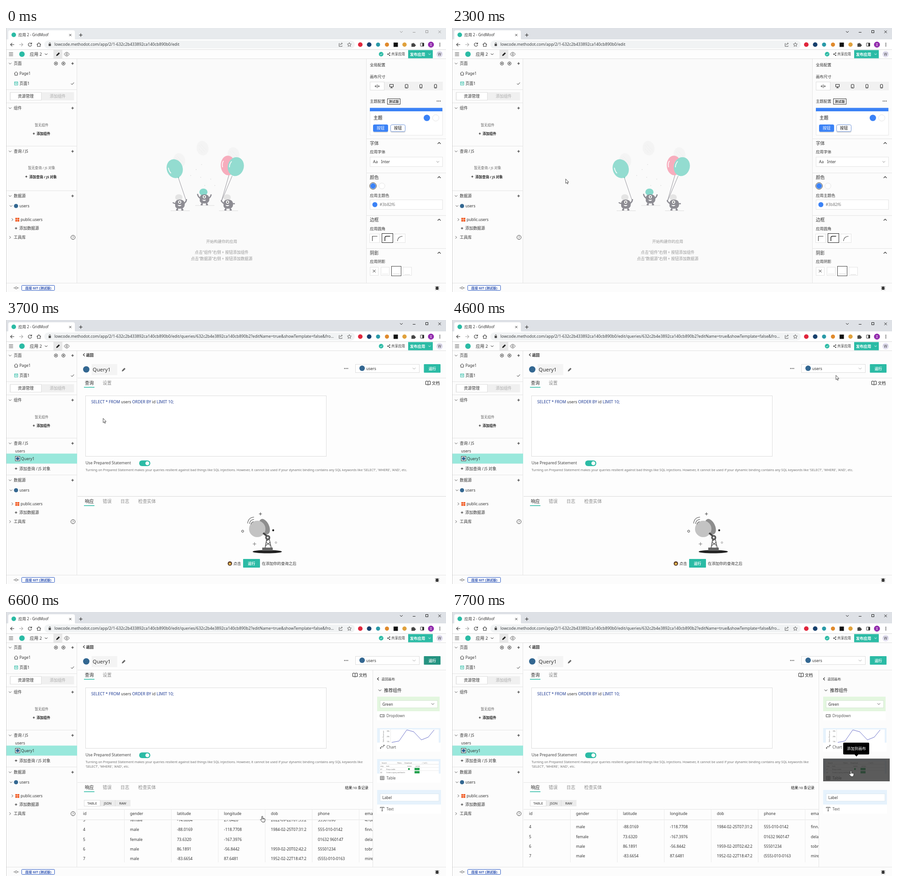
An HTML page that plays this animation: 965x580 px, repeating every 8000 ms.

```html
<!DOCTYPE html>
<html>
<head>
<meta charset="utf-8">
<style>
html, body { margin: 0; width: 100%; height: 100%; overflow: hidden; background: #fbfbfb }
svg { display: block; width: 965px; height: 580px; font-family: "Noto Sans", "Open Sans", "Noto Sans CJK SC", "Noto Sans CJK", sans-serif }
text { white-space: pre }
</style>
</head>
<body>
<script>
const TEAL = '#2bbba5', BLUE = '#3b82f6', INK = '#333', RULE = '#e4e4e4', GREY = '#999', PG = '#336791';

// Latin runs are set a little smaller than the CJK around them
const T = (x, y, s, size = 8.7, color = INK, more = '') =>
  `<text x="${x}" y="${y}" font-size="${size}" fill="${color}" ${more}>` +
  s.replace(/[ -~“”…]+/g, m => `<tspan font-size="${(size * .945).toFixed(2)}">${m}</tspan>`) + '</text>';
const B = (x, y, s, size, color, more = '') => T(x, y, s, size, color, 'font-weight="600" ' + more);
const MID = 'text-anchor="middle"';
const R = (x, y, w, h, fill = 'none', stroke = 'none', r = 0) =>
  `<rect x="${x}" y="${y}" width="${w}" height="${h}" rx="${r}" fill="${fill}" stroke="${stroke}"/>`;
const box = (x, y, w, h, stroke = RULE, fill = '#fff', r = 0) => R(x + .5, y + .5, w - 1, h - 1, fill, stroke, r);
const C = (x, y, r, fill = 'none', stroke = 'none') =>
  `<circle cx="${x}" cy="${y}" r="${r}" fill="${fill}" stroke="${stroke}"/>`;
const E = (x, y, rx, ry, fill, turn = 0) =>
  `<ellipse rx="${rx}" ry="${ry}" fill="${fill}" transform="translate(${x} ${y}) rotate(${turn})"/>`;
const P = (d, stroke = INK, w = 1, fill = 'none') =>
  `<path d="${d}" stroke="${stroke}" stroke-width="${w}" fill="${fill}"/>`;
const hline = (y, x1, x2, c = RULE) => R(x1, y, x2 - x1, 1, c);
const down = (x, y, c = '#555', r = 2.8) => P(`M${x - r},${y - r / 2}l${r},${r} ${r},${-r}`, c);
const up = (x, y) => P(`M${x - 3.3},${y + 1.7}l3.3,-3.3 3.3,3.3`, '#222', 1.2);
const right = (x, y) => P(`M${x - 1.5},${y - 2.8}l2.8,2.8 -2.8,2.8`, '#555');
const left = (x, y) => P(`M${x + 1.5},${y - 3}l-3,3 3,3`, '#222', 1.1);
const plus = (x, y, r = 2.8, c = '#222') => P(`M${x - r},${y}h${2 * r}M${x},${y - r}v${2 * r}`, c, 1.1);
const cross = (x, y, r = 2.7, c = INK) => P(`M${x - r},${y - r}l${2 * r},${2 * r}m0,${-2 * r}l${-2 * r},${2 * r}`, c);
const dots = (x, y, dx = 3.4, dy = 0) => [-1, 0, 1].map(i => C(x + i * dx, y + i * dy, 1, INK)).join('');
const pencil = (x, y, c) => P(`M${x - 3.5},${y + 3.5}l.7,-2.4 4.6,-4.6 1.8,1.8 -4.6,4.6z`, c, .8, c);
const gear = (x, y) => C(x, y, 3.6, 'none', INK) + C(x, y, 1.4, INK);
const search = (x, y) => C(x - 1, y - 1, 3, 'none', INK) + P(`M${x + 1.3},${y + 1.3}l3,3`);
const G = (move, s) => `<g transform="translate(${move})">${s}</g>`;
// shown only within the given spans of ms, "from-to from-to"
const on = (spans, s) => `<g data-on="${spans}">${s}</g>`;

function windowControls(c) {
  return down(867, 8.5, c, 3) + P('M892,9.5h6', c) + R(920.5, 5.5, 5, 5, 'none', c) + cross(951, 8.5, 2.8, c);
}

function browser() {
  const base = 'lowcode.methodot.com/app/2/1-632c2b433892ca140cb890b0/edit';
  const query = v => base + `/queries/632c2b4e3892ca140cb890b2?editName=true&amp;showTemplate=${v}&amp;fro…`;
  const url = s => T(106, 39.3, s, 9.3, '#3c4043');
  return R(0, 0, 965, 26, '#dee1e6') + on('0-200', R(0, 0, 965, 26, '#e7eaed') + windowControls('#999')) +
    on('200-8000', windowControls('#222')) +
    P('M2,26q3,0 3,-3V9q0,-4 4,-4H147q4,0 4,4V23q0,3 3,3z', 'none', 0, '#fff') +
    C(17, 15, 5, TEAL) + T(27, 18, '应用 2 - GridMoof', 8.5) + cross(141, 15.5, 2.3) + plus(164, 15.5, 3.7) +
    R(0, 25, 965, 22, '#fff') + R(84, 27.5, 681, 17.5, '#f1f3f4', 'none', 8.7) +
    P('M18,36.5h-8m3.6,-3.7l-3.7,3.7 3.7,3.7', '#444', 1.2) + P('M29,36.5h8m-3.6,-3.7l3.7,3.7 -3.7,3.7', '#aaa', 1.2) +
    P('M55.5,34.2a3.7,3.7 0 1 0 .7,3M56.3,32v2.9h-2.9', '#444', 1.2) +
    P('M67.5,36.5l4.5,-4 4.5,4M69,35.5v5h6v-5', '#444', 1.2) +
    R(93.5, 35, 5, 4.6, '#444', 'none', .6) + P('M94.6,35v-1.3a1.5,1.5 0 0 1 3,0v1.3', '#444', .9) +
    on('0-2400', url(base)) + on('2400-3700', url(query('true'))) + on('3700-8000', url(query('false'))) +
    P('M732,34h-1.5v6.5h6.5v-2M732.5,38q.5,-4 5,-4m-2,-2l2.2,2 -2.2,2', '#555', .9) +
    P('M753,32l1.3,2.9 3.1,.3 -2.3,2.1 .7,3.1 -2.8,-1.6 -2.8,1.6 .7,-3.1 -2.3,-2.1 3.1,-.3z', '#555', .9) +
    C(777, 36.5, 5, '#e0263c') + C(796.5, 36.5, 5, '#17406d') + C(816, 36.5, 4.5, '#2a9aa8') + C(835.5, 36.5, 4.5, '#e08a2c') +
    R(850, 32, 9.5, 9.5, '#111') + C(874, 36.5, 4.7, '#e0a13c') +
    P('M889.5,34.5h2a1.5,1.5 0 1 1 3,0h2v2.2a1.4,1.4 0 1 1 0,2.6v1.7h-7z', '#444', .6, '#444') +
    R(909, 33, 7.5, 7, 'none', '#333', .5) + R(913, 33, 3.5, 7, '#333') +
    C(932, 36.5, 6.5, '#8e24aa') + T(932, 39, '文', 6.5, '#fff', MID) + dots(951.5, 36.5, 0, 3) + hline(47, 0, 965, '#dcdcdc');
}

function header() {
  return R(0, 48, 965, 19, '#fdfdfd') + P('M6.5,54.5h9m-9,3.2h9m-9,3.2h9', '#444') + C(35, 57.5, 6, TEAL) +
    T(52, 61, '应用 2', 9.6) + down(88, 57.5, '#222') + R(104, 48, 19.5, 19, '#e8e8e8') + pencil(114, 57.5, '#222') +
    P('M127.5,57.5q5.7,-8.5 11.4,0q-5.7,8.5 -11.4,0z', '#555') + C(133.2, 57.5, 1.7, 'none', '#555') +
    C(822.7, 57.5, 5, TEAL) + P('M820.3,57.6l1.8,1.8 3.1,-3.4', '#fff') +
    P('M841.5,55l-4,2.5 4,2.5', INK, .8) + C(841.5, 55, 1.2, INK) + C(837.5, 57.5, 1.2, INK) + C(841.5, 60, 1.2, INK) +
    T(845, 60.3, '共享应用', 7.5) + R(882, 48.5, 54, 18, TEAL) + B(886, 60.5, '发布应用', 8.3, '#fff') + down(929, 57.5, '#fff', 2.4) +
    C(951, 57.5, 7, '#e2dff0') + T(951, 60.6, 'W', 8.5, '#444', MID) + hline(67, 0, 965, '#e0e0e0');
}

const section = (y, name) => hline(y - 12, 0, 155) + down(9, y) + T(17, y + 3, name) + plus(146, y);

function sidebar() {
  const sources = section(369, '数据源') + down(11, 391) + C(22, 391, 4.6, PG) + T(29.5, 394, 'users', 9) +
    right(14, 421) + R(20.5, 417, 4, 3.6, '#f15a22') + R(25.2, 417, 4, 3.6, '#f15a22') + R(20.5, 421.3, 4, 4, '#f15a22') + R(25.2, 421.3, 4, 4, '#f15a22') +
    T(32, 424, 'public.users', 9) + plus(22, 440, 2.6) + T(29, 443, '添加数据源') + right(9, 460) + T(17, 463, '工具库') +
    C(147, 460, 4.6, 'none', '#444') + T(147, 463, '?', 7.5, '#333', MID);
  return R(0, 68, 155, 492, '#fcfcfc') + R(155, 68, 1, 492, RULE) +
    down(9, 78) + T(17, 81, '页面') + gear(109.5, 78) + gear(126, 78) + plus(146, 78) +
    P('M18,100l4.2,-3.8 4.2,3.8M19.3,99.2v4.6h5.8v-4.6') + T(29.5, 103.3, 'Page1', 8.9) +
    R(18.8, 118.3, 7, 7, 'none', TEAL) + P('M18.8,120.8h7m-4.5,2h2.5', TEAL) + T(29.5, 125, '页面1') + P('M142.5,122l2.3,2.3 4.3,-4.5') +
    hline(135, 0, 155) + R(8, 141, 141, 18, '#f0f0f0') + box(9, 141, 69, 18, '#ddd') + T(26, 153.3, '资源管理') + T(96, 153.3, '添加组件', 8.7, '#aaa') +
    section(176, '组件') + T(78, 215.7, '暂无组件', 7.5, '#666', MID) + plus(61, 232, 2.2) + B(67, 235, '添加组件', 7.5, '#222') +
    section(271, '查询 / JS') +
    on('0-2400', T(78, 310, '暂无查询 / JS 对象', 7.6, '#666', MID) + on('900-1100', R(39, 318, 78, 17, '#ececec')) +
      plus(44.5, 326.5, 2.2) + B(51, 329.5, '添加查询 / JS 对象', 7.6, '#222') + sources) +
    on('2400-8000', T(20, 290.5, 'users', 9) + R(0, 293.5, 156, 22, '#99e8dc') + box(20, 299, 11, 11, '#444') + C(25.5, 304.5, 3.6, PG) +
      T(33, 308, 'Query1', 9) + plus(22, 326.5, 2.6) + T(29, 329.7, '添加查询 / JS 对象') + G('0 -17', sources)) +
    on('1100-2200', R(137.5, 260, 18, 21.7, '#1f1f1f') + plus(146, 271, 2.8, '#fff'));
}

function footer() {
  return R(0, 560, 965, 20, '#fcfcfc') + hline(560, 0, 965) + P('M16.5,571h3.3m5,0h3.3', '#666') + C(22.3, 571, 2.3, 'none', '#666') +
    box(34, 565, 73, 12, '#2b59c3', '#fff', 1) + B(70.7, 573.8, '连接 GIT (测试版)', 7.4, '#2b50b0', MID) +
    P('M941,568l2.5,1.5M941,572h2.5M941.5,575.5l2.2,-1.5M950,568l-2.5,1.5M950,572h-2.5M949.5,575.5l-2.2,-1.5') + E(945.5, 571.5, 2.8, 4, INK);
}

// armL and armR are the heights of the hands above the body's centre
function monster(x, y, hair, hairSize, armL, armR, eye) {
  const c = '#8d8c93';
  return hline(y + 16, x - 20, x + 22, '#ddd') + E(x - 2, y - 13, hairSize, hairSize * .85, hair) +
    P(`M${x - 8},${y + 1}q-6,${-armL / 3} -7,${-armL}M${x + 9},${y + 1}q5,${-armR / 3} 6,${-armR}`, c, 2.6) +
    P(`M${x - 5},${y + 9}v5.5h-3M${x + 5},${y + 9}v5.5h3`, c, 3) +
    P(`M${x - 10},${y + 3}q-1,-11 10,-11t11,11q0,9 -11,9t-10,-9z`, 'none', 0, c) +
    C(x + eye, y - 2.5, 3.4, '#fff') + C(x + eye, y - 2.5, 1.5, '#555') + P(`M${x + eye - 5},${y + 4}q5,5 9,0z`, 'none', 0, '#fff');
}

function emptyCanvas() {
  const faint = [[380, 291], [431, 264], [499, 278]].map(([x, y]) =>
    E(x, y, 13, 16, '#f4f4f4', -10) + P(`M${x - 8},${y - 7}l13,15m-13,-7l9,10m-5,-20l13,14`, '#ededed', .8)).join('');
  const specks = [[429, 300], [417, 311], [405, 324], [436, 346], [427, 328], [449, 332], [458, 346]].map(([x, y]) => C(x, y, 1, '#e0e0e0')).join('');
  return R(156, 68, 634, 492, '#fafafa') + faint + specks +
    P('M378,329L396,382M489,323L472,382M496,325L472,382', '#8d8c93', .9) +
    E(370, 309, 17.5, 21, '#93dcd0', -18) + P('M376,328l4,-1 -1,4z', 'none', 0, '#7fcabd') + P('M356,307q2,9 6,12', '#fff', 1.6) +
    E(487, 302, 16, 21.5, '#f7adbd', -3) + P('M475,306q-2,-9 2,-14', '#fff', 1.6) +
    E(504, 304.5, 17.5, 21, '#93dcd0', 15) + P('M490,306q0,-8 5,-13', '#fff', 1.6) +
    monster(381, 385, '#e4e4e4', 8, 3, 10, 0) + monster(435, 373.5, '#86d8cb', 9, 10, 9, 0) + monster(487, 385, '#e4e4e4', 8, 8, 0, -1);
}

function canvasHints() {
  return T(473, 472, '开始构建你的应用', 8.5, GREY, MID) + T(473, 496.3, '点击“组件”右侧 + 按钮添加组件', 8.6, GREY, MID) +
    T(473, 510.3, '点击“数据源”右侧 + 按钮添加数据源', 8.6, GREY, MID);
}

function themePanel() {
  const fold = (y, name, sub, subY = y + 22) =>
    hline(y - 10, 791, 965) + T(798, y + 3.5, name, 9.8) + up(950, y) + T(798, subY, sub, 8.5);
  const phones = [878, 910, 942].map((x, i) => R(x - 2.5, 124, 5 + (i < 1), 8, 'none', '#222', 1) + R(x - 1, 130, 2, 1, '#222')).join('');
  return R(790, 68, 175, 492, '#fcfcfc') + R(790, 68, 1, 492, RULE) +
    T(798, 83.5, '全局配置', 8.5) + T(798, 110, '画布尺寸', 8.5) + R(798, 118, 160, 19, '#f1f1f1') + box(798, 118, 32, 19, '#ddd') +
    P('M814,124v8M811,126l-1.8,2 1.8,2M817,126l1.8,2 -1.8,2M809.5,128h3M815.5,128h3', '#222', .9) +
    R(841.5, 124, 8, 5, 'none', '#222') + P('M843,131.5h5M845.5,129v2', '#222') + phones +
    T(798, 164, '主题配置', 8.5) + box(836, 155, 29, 13, '#333') + B(850.5, 164, '测试版', 7.3, INK, MID) + dots(949, 160.5) +
    box(798, 176, 160, 60, '#e8e8e8') + R(798, 175.5, 159, 7.5, BLUE) + T(806, 201.3, '主题', 9.7, '#111', 'font-weight="500"') + C(923, 197.5, 7, BLUE) + C(942.5, 197.5, 7, '#fff', RULE) +
    R(805, 213, 33, 17, '#0002', 'none', 3) + R(805, 212, 33, 16, BLUE, 'none', 3) + T(821.5, 223, '按钮', 8.6, '#fff', MID) +
    R(843, 213, 33, 17, '#0002', 'none', 3) + box(843, 212, 33, 16, '#6f95d8', '#fff', 3) + T(859.5, 223, '按钮', 8.6, '#111', MID) +
    fold(253, '字体', '应用字体') + box(798, 283, 160, 22) + T(805, 297.3, 'Aa', 9) + T(822.5, 297.3, 'Inter', 9) + down(947, 294, '#888') +
    fold(328, '颜色', '应用主题色', 371) + C(805, 347, 7.3, '#fff', '#333') + C(805, 347, 6, BLUE) + C(824.5, 347, 6.5, '#fff', RULE) +
    box(798, 377, 160, 22) + C(809, 388, 5.5, BLUE) + T(819.5, 391.3, '#3b82f6', 9.2, '#777') +
    fold(421.5, '边框', '应用圆角') + box(797, 452, 23, 20) + box(824, 451, 25, 21, '#222') + box(852, 452, 24, 20) +
    P('M803.5,468v-10.5h11', '#444', 1.2) + P('M831,468v-7q0,-3.5 3.5,-3.5h8', '#222', 1.5) + P('M858.5,468q1,-10 11,-10.5', '#444', 1.2) +
    fold(494, '阴影', '应用阴影') + box(798, 525, 19, 19) + cross(807.5, 534, 3) + box(822, 525, 19, 19) + hline(540, 825, 838) +
    box(845, 523, 22, 22, '#444') + hline(540, 849, 863, '#ccc') + box(870, 525, 20, 19) + hline(541, 874, 886, '#ddd');
}

function createMenu() {
  const rows = [['新建 API', C(170.5, 314.5, 2.8, '#2d86ab')], ['新建 JS 对象', B(170.5, 339, 'JS', 7.3, '#222', MID)],
    ['新建 cURL 导入', P('M167.8,361l2.5,-6m.4,6l2.5,-6', '#333', .9)], ['users 查询', C(170.5, 379.5, 3.6, PG)], ['添加数据源', plus(170.5, 401.5, 2)]];
  return R(156, 261, 153, 154, '#0001', 'none', 2) + box(156, 259, 152, 154, '#e3e3e3') + T(165, 274, '新建', 8.6) +
    search(170, 293) + T(180, 296, '搜索数据源', 8.5, '#777') + on('1100-1500 2000-2200', R(180, 287.5, .8, 11, '#222')) +
    R(157, 304, 150, 21, '#f0f0f0') + rows.map(([name, icon], i) => {
      const y = 314.5 + i * 21.75;
      return box(165, Math.round(y - 6), 12, 12, '#555') + icon + T(181, y + 3, name, 8.9, '#222');
    }).join('');
}

function preparedNote() {
  const start = 'Turning on Prepared Statement makes your queries resilient against bad things like SQL injections. However, it cannot be used if your dynamic binding contains any SQL keywords like';
  const end = "'SELECT', 'WHERE', 'AND', etc.", small = (y, s) => T(174.5, y, s, 7.53, '#707070');
  return T(174.5, 290, 'Use Prepared Statement', 9.2, '#444') + R(292, 282, 24.5, 12.5, TEAL, 'none', 6.2) + C(310, 288.2, 4.3, '#fff') +
    on('2400-5900', small(305.7, start + ' ' + end)) + on('5900-8000', small(305.7, start) + small(315.5, end));
}

function tabs(y, names) {
  return names.map((n, i) => T(173 + i * 39, y, n, 9.7, i ? '#888' : '#222')).join('') + R(171, y + 5, 23, 1.5, TEAL);
}

function dish() {
  return E(573, 509, 32, 3.6, '#222') + R(562, 500, 23, 7, '#666') + P('M568,502l4,-23h5l5,23M569,496l11,-8m-10,0l11,8M571,486l8,-6', '#555', 1.5) +
    E(567, 454, 10, 18, '#8e8e8e', -25) + C(551, 459, 18, '#c3c3c3') + P('M564,468l10,8', '#444', 4) + C(574, 478, 5.5, '#555') + C(574, 478, 2.3, '#ddd') +
    P('M530,447q1,-13 14,-14M534,448q1,-9 10,-10M537,449q1,-5 6,-6', '#555', 1.1) + plus(558, 426, 3.3, '#444') + plus(545, 492, 3.8, '#777') +
    C(519, 464, 2.3, 'none', '#333') + C(586, 462, 2.2, '#222') + C(592, 489, 1.8, 'none', '#999') +
    C(491, 535, 4.8, '#5a3c2a') + C(491, 535.5, 2.5, '#f2c14e') + T(498.5, 538, '点击', 8.5) + R(520, 525, 37, 19, TEAL, 'none', 1) +
    B(538.5, 537.7, '运行', 8, '#fff', MID) + T(561, 538, '在添加你的查询之后', 8.45);
}

const columns = [169, 272, 375, 478, 581, 684, 787];
const cells = (y, values) => values.map((v, i) => T(columns[i], y, v, 9)).join('');

function results() {
  const rows = [
    ['1', 'female', '41.2075', '-103.5512', '1971-05-11T03:18:2', '55501022', 'nora'],
    ['2', 'male', '-27.9310', '64.1187', '1966-11-03T15:40:2', '555-010-0118', 'otis'],
    ['3', 'female', '-14.6884', '27.6428', '2022-09-22T07:55:2', '55501090', '47de'],
    ['4', 'male', '-88.0169', '-118.7708', '1984-02-25T07:31:2', '555-010-0142', 'finn.'],
    ['5', 'female', '73.6320', '-167.3976', '', '01632 960147', 'dela'],
    ['6', 'male', '86.1891', '-56.8442', '1959-02-20T02:42:2', '55501234', 'tobr'],
    ['7', 'male', '-83.6654', '87.6481', '1952-02-22T18:47:2', '(555)-010-0163', 'mirea'],
    ['8', 'female', '12.4406', '35.9027', '1990-08-14T11:05:2', '55501077', 'lune']];
  const names = ['id', 'gender', 'latitude', 'longitude', 'dob', 'phone', 'ema'];
  return tabs(389, ['响应', '错误', '日志', '检查实体']) + T(743.5, 389, '结果:10 条记录', 7.8, '#111', 'font-weight="500"') +
    R(171, 413, 102, 14, '#ececec') + box(171, 413, 36, 14, '#ddd') + R(239, 413, 1, 14, '#ddd') +
    T(189, 423, 'TABLE', 7.9, INK, MID) + T(223, 423, 'JSON', 7.7, INK, MID) + T(256, 423, 'RAW', 7.7, INK, MID) +
    hline(433, 157, 804) + hline(456, 157, 804) + cells(445.7, names) +
    '<g clip-path="url(#body)"><g id="rows">' + rows.map((r, i) => cells(470.9 + i * 21.15, r)).join('') + '</g></g>' +
    R(659, 457, 12, 92, '#fdfdfd') + columns.slice(1).map(x => R(x - 13, 433, 1, 117, '#ebebeb')).join('');
}

function suggestions() {
  const card = (y, w, tint, name) => R(814, y, w, 52, '#fff') + R(814, y, w, 32, tint) + T(834.5, y + 45, name, 8.6, '#555');
  const tiny = (x, y, s, c = '#666') => T(x, y, s, 3.6, c);
  const mini = R(820, 328, 129, 27, '#fff') + hline(334, 820, 949) + hline(341, 820, 949, '#eee') + hline(348, 820, 949, '#eee') +
    tiny(824, 332.5, 'Search') + tiny(858, 332.5, 'Filters') + tiny(874, 332.5, 'Download') + tiny(912, 332.5, '‹ 1 of 2 ›') + tiny(821, 339.5, 'step') +
    tiny(834, 339.5, 'task') + tiny(880, 339.5, 'status') + tiny(898, 339.5, 'action') + tiny(821, 346.5, '#1') + tiny(834, 346.5, 'Drop a table') +
    tiny(821, 353.5, '#2') + tiny(834, 353.5, 'Create a query and bind it') + R(882, 343, 3.5, 4, '#1fa04b') + R(896, 342.5, 11, 5, '#1fa04b') + R(896, 349.5, 11, 5, '#1fa04b');
  return R(804, 128, 161, 432, '#fcfcfc') + R(804, 128, 1, 432, RULE) + left(816, 147) + T(823.5, 150, '返回画布', 7.4) +
    down(820, 172, '#222', 3) + T(829, 176, '推荐组件', 9.7, '#222') +
    card(186, 137, '#e3f6df', 'Dropdown') + box(820, 194, 127, 17, '#d6e6d4') + T(825.5, 205.5, 'Green', 8.6) + down(936, 202, '#555', 3) +
    R(820.5, 225.5, 9, 5, 'none', '#555') + P('M825.5,228h2.5', '#555') +
    card(255, 139, '#e6f2fc', 'Chart') + R(820, 258, 129, 29, '#fff') + tiny(835, 263, '30k') + tiny(835, 275, '20k') + tiny(835, 286, '10k') +
    T(-286, 829, 'Sales Revenue', 4, '#777', 'transform="rotate(-90)"') + R(843, 258, .6, 28, '#ddd') +
    P('M846,286.5L862,283.5 879,259 894,263 911,281 926,275 939,259', '#6a70c9') +
    P('M821.5,299l2.5,-4 2.5,2 2.5,-4', '#444') + C(821.5, 299, 1.2, '#444') + C(829, 293, 1.2, '#444') +
    card(323, 139, '#e6f2fc', 'Table') + mini + R(821, 361, 8, 7.5, 'none', '#555') + P('M821,363.7h8m-8,2.4h8M825,361v7.5', '#555', .8) +
    card(391, 140, '#e6f2fc', 'Text') + box(820, 399, 130, 17, '#dde8f0') + T(825.5, 410.7, 'Label', 8.6) + P('M821,431v-2h8v2M825,429v8M823.5,437h3', '#444', 1.1) +
    on('6900-8000', R(814, 322, 146, 50, '#333c')) +
    on('7100-8000', R(858, 287, 57, 26, '#000', 'none', 2) + P('M883,313l4,4.5 4,-4.5z', 'none', 0, '#000') + T(887, 303.3, '添加到画布', 8.4, '#fff', MID));
}

function queryPage() {
  const runButton = (c, label = B(935, 109.5, '运行', 8, '#fff', MID)) => R(916.5, 97, 36.5, 18.7, c, 'none', 1) + label;
  const doc = P('M925.5,135q-2.5,-1.5 -5,-.5v7.5q2.5,-.8 5,.7q2.5,-1.5 5,-.7v-7.5q-2.5,-1 -5,.5v7.5', '#222') + T(934, 141.7, '文档', 8.7, '#222');
  const templates = ['Create', 'Select', 'Update', 'Delete'].map((n, i) =>
    R(194.5, 201 + i * 17.6, 2, 2, 'none', '#b9c3d3') + T(200, 205 + i * 17.6, n, 9.15, '#4a5b7c')).join('');
  const name = s => `<tspan fill="#333">${s}</tspan>`;
  const sql = T(187, 183, 'SELECT * FROM users ORDER BY id LIMIT 10;', 9.2, '#1d3a94').replace(/users|\bid\b/g, name);
  return R(156, 68, 809, 492, '#fdfdfd') + left(171, 76.5) + B(175.5, 79.5, '返回', 8.4, '#222') + C(176, 108.5, 7, PG) + R(188, 97, 56, 24, '#f4f4f4') +
    on('2400-3100', R(190, 100, 39.5, 17.5, TEAL) + T(190, 113, 'Query1', 12.1, '#fff')) +
    on('3100-8000', T(190, 113, 'Query1', 12.1) + pencil(258, 109, '#666')) + dots(746, 106.5) +
    box(766, 97, 141, 19, '#ddd') + C(781, 106, 6, PG) + T(790, 109.5, 'users', 9) + down(895, 106.5, '#aaa', 3.2) +
    on('2400-4800 7600-8000', runButton(TEAL)) + on('4800-5200 5900-7600', runButton('#259381')) +
    on('5200-5900', runButton('#1c6b5f', P('M931.5,107a3.5,3.5 0 0 1 7,-.5', '#6fa89f'))) +
    hline(127, 157, 965) + tabs(142, ['查询', '设置']) + on('2400-5900', doc) + on('5900-8000', G('-160 0', doc)) +
    on('2400-3700', on('3200-3700', R(189, 211, 65, 17, '#e6edf8')) + T(189, 186, 'Click here to start with a blank state or select a template.', 9.15, '#4a5b7c') + templates + preparedNote()) +
    on('3700-8000', box(174, 166, 529, 134, '#ddd') + sql + G('0 26.5', preparedNote())) +
    on('2400-5300', hline(387, 157, 965, '#d8d8d8') + tabs(402, ['响应', '错误', '日志', '检查实体']) + dish()) +
    on('5300-8000', hline(374, 157, 965)) +
    on('5300-5900', T(530.5, 462, '正在请求 Query', 8.8) + box(530, 471, 52, 19, '#5479cc', '#fff', 1) + B(556, 483.5, '取消请求', 7.7, '#2b50b0', MID)) +
    on('5900-8000', results() + suggestions());
}

const hand = P('M-1.2,6V.8a1.15,1.15 0 0 1 2.3,0V4.2q4,.2 5,1.7v3l-1.2,3.6h-5q-1.6,-3 -4,-5q.2,-1.8 2.9,-.6zM1.1,4.2v2.6M3.5,4.7v2', '#222', .9, '#fff');
const arrow = P('M0,0v9.6l2.2,-2 1.5,3.4 1.5,-.7 -1.5,-3.2h3z', '#222', .8, '#fff');

document.body.innerHTML = '<svg viewBox="0 0 965 580"><clipPath id="body"><rect x="157" y="457" width="647" height="92"/></clipPath>' +
  on('0-2400', emptyCanvas() + canvasHints() + themePanel()) + on('2400-8000', queryPage()) + sidebar() + on('1100-2200', createMenu()) +
  browser() + header() + footer() + R(0, 0, 1, 580, '#d0d0d0') +
  '<g id="cursor">' + on('900-2200 2700-3700 4800-5300 5900-6700 6900-8000', hand) +
  on('100-900 2200-2700 3700-4800 5300-5900 6700-6900', arrow) + '</g></svg>';

// [ms, x, y] of the pointer tip
const path = [[100, 720, 118], [900, 96, 322], [1000, 96, 322], [1100, 178, 317], [1300, 178, 317], [1700, 244, 361], [2100, 201, 373],
  [2200, 201, 373], [2500, 346, 249], [2700, 317, 233], [2900, 248, 220], [3000, 248, 220], [3300, 213, 216], [3700, 213, 216],
  [3900, 359, 213], [4100, 375, 219], [4300, 706, 141], [4500, 825, 124], [4600, 842, 121.5], [4900, 933, 104], [5200, 933, 104],
  [5700, 696, 322.5], [6000, 562, 449], [6600, 562, 449], [6900, 881, 346], [7400, 876, 348], [7700, 875, 349]];
const scroll = [[6000, 0], [6500, 53], [6600, 53], [6700, 59]];

function at(track, t) {
  const i = track.findIndex(k => k[0] > t);
  if (i < 0) return track[track.length - 1].slice(1);
  if (!i) return track[0].slice(1);
  const a = track[i - 1], b = track[i], f = (t - a[0]) / (b[0] - a[0]);
  return a.slice(1).map((v, j) => v + (b[j + 1] - v) * f);
}

const timed = [...document.querySelectorAll('[data-on]')].map(el =>
  ({ el, spans: el.dataset.on.split(' ').map(s => s.split('-').map(Number)) }));
const cursor = document.getElementById('cursor'), rows = document.getElementById('rows');
const begin = performance.now();

function draw() {
  const t = Math.floor((performance.now() - begin) % 8000 / 100) * 100;
  for (const { el, spans } of timed) el.style.display = spans.some(([a, b]) => t >= a && t < b) ? '' : 'none';
  cursor.setAttribute('transform', `translate(${at(path, t)})`);
  rows.setAttribute('transform', `translate(0 ${-at(scroll, t)[0]})`);
  requestAnimationFrame(draw);
}
draw();
</script>
</body>
</html>
```
